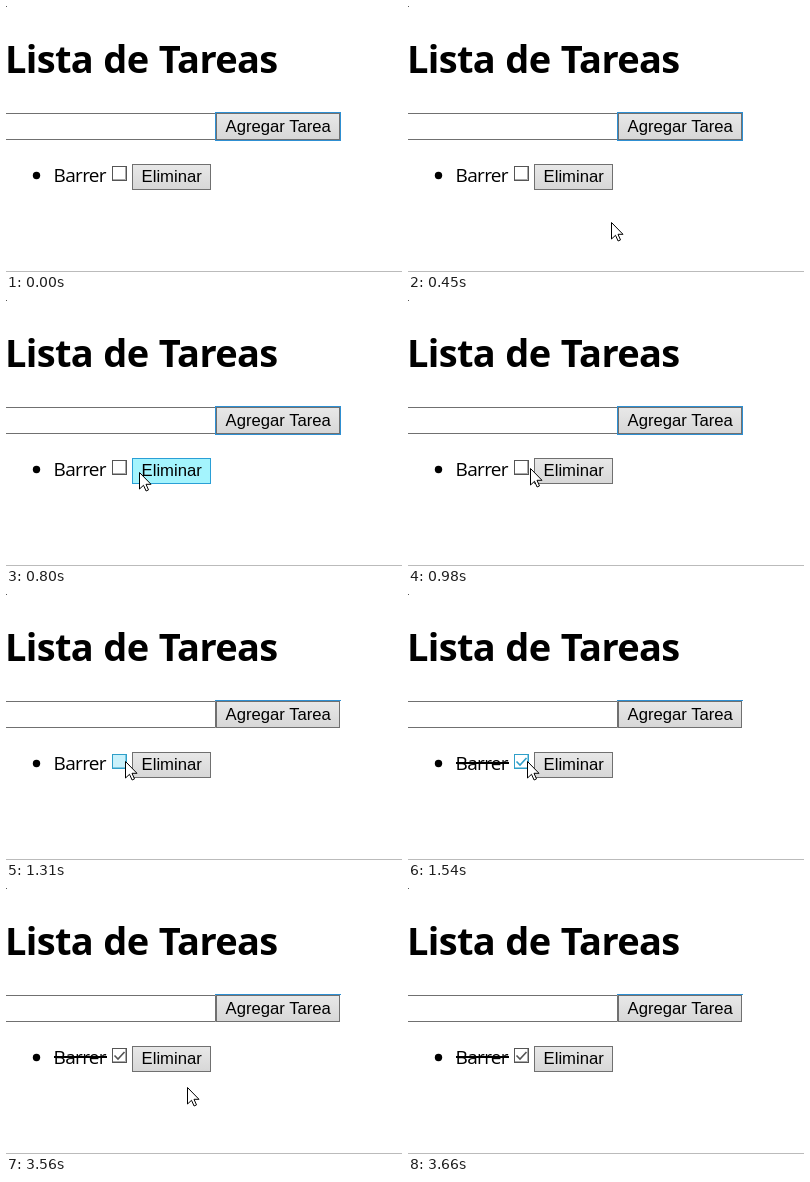
An HTML page for the animation above (4340 ms loop, 396 by 266 pixels).

```html
<!DOCTYPE html>
<html lang="es">
<head>
<meta charset="utf-8">
<title>Lista de Tareas</title>
<style>
  html, body { margin: 0; width: 100%; height: 100%; overflow: hidden; background: #fff; }
  svg { display: block; width: 396px; height: 266px; }
  text { font-family: "Open Sans", "Noto Sans", sans-serif; }
  .label { font: 16.67px "Liberation Sans", Arial, sans-serif; }
  .line { fill: none; stroke: #707070; }
  .button { fill: url(#face); stroke: #707070; }
  .hover .button { fill: #a4f4fd; stroke: #2a9fd6; }
  #check { fill: none; stroke: #555; }
  #check rect { fill: #fff; }
  #check.hover { stroke: #2f9fc9; }
  #check.pressed rect { fill: #c9f1fb; }
</style>
</head>
<body>
<svg viewBox="0 0 396 266">
  <defs>
    <linearGradient id="face" x2="0" y2="1">
      <stop stop-color="#e8e8e8"/>
      <stop offset="1" stop-color="#d7d7d7"/>
    </linearGradient>
  </defs>
  <path d="M0 0h1v1h-1z" fill="#555"/>
  <text x="-1" y="67" font-size="38" font-weight="700" letter-spacing="-.65" word-spacing="1">Lista de Tareas</text>
  <path class="line" d="M-2 107.5H209.5V133.5H-2"/>
  <rect class="button" x="210.5" y="107.5" width="123" height="26"/>
  <path d="M209 106.5H335" stroke="#2e8fd2"/>
  <rect id="focus" x="209.5" y="106.5" width="125" height="28" fill="none" stroke="#2e8fd2"/>
  <text class="label" x="219.6" y="126">Agregar Tarea</text>
  <circle cx="30.5" cy="169.5" r="3.7"/>
  <text x="47.6" y="176" font-size="19" letter-spacing="-.7">Barrer</text>
  <path id="strike" d="M48 169H101" stroke="#000" stroke-width="2"/>
  <g id="check">
    <rect x="106.5" y="160.5" width="14" height="14"/>
    <path d="M119.5 161V173.5H107" opacity=".5"/>
    <path id="tick" d="M108.5 167.5l3.5 3.5 6.5-7" stroke-width="1.6"/>
  </g>
  <g id="remove">
    <rect class="button" x="126.5" y="158.5" width="78" height="25"/>
    <text class="label" x="135.6" y="176">Eliminar</text>
  </g>
  <path d="M0 265.5H396" stroke="#bbb"/>
  <path id="cursor" d="M.5.5V17l4-3.7 2.6 5.7 2.4-1.1-2.5-5.6H12z" fill="#fff" stroke="#000"/>
</svg>
<script>
  const LOOP = 4340;
  const [focus, strike, check, tick, remove, cursor] =
    ["focus", "strike", "check", "tick", "remove", "cursor"].map(id => document.getElementById(id));

  // Pointer path: time, x, y
  const path = [
    [310, 293, 262], [380, 246, 238], [450, 203, 216], [560, 172, 197],
    [670, 148, 181], [800, 133, 172], [850, 133, 172], [910, 126, 169],
    [980, 122, 168], [1100, 119, 167], [3480, 119, 167], [3500, 125, 169],
    [3560, 180, 198], [3660, 300, 262]
  ];

  function pointer(t) {
    const i = path.findIndex(p => p[0] > t);
    if (i < 1) return null;
    const [a, b] = [path[i - 1], path[i]];
    const k = (t - a[0]) / (b[0] - a[0]);
    return [a[1] + (b[1] - a[1]) * k, a[2] + (b[2] - a[2]) * k];
  }

  const show = (el, on) => el.style.display = on ? "" : "none";

  function draw(t) {
    const p = pointer(t);
    const done = t >= 1540;
    show(cursor, p);
    if (p) cursor.setAttribute("transform", `translate(${p.map(Math.round)})`);
    show(strike, done);
    show(tick, done);
    show(focus, t < 1310);
    check.classList.toggle("hover", t >= 1060 && t < 3520);
    check.classList.toggle("pressed", t >= 1310 && !done);
    remove.classList.toggle("hover", !!p && p[0] > 126.5 && p[0] < 205 && p[1] > 158 && p[1] < 184);
  }

  const start = performance.now();
  function animate() {
    draw((performance.now() - start) % LOOP);
    requestAnimationFrame(animate);
  }
  animate();
</script>
</body>
</html>
```
